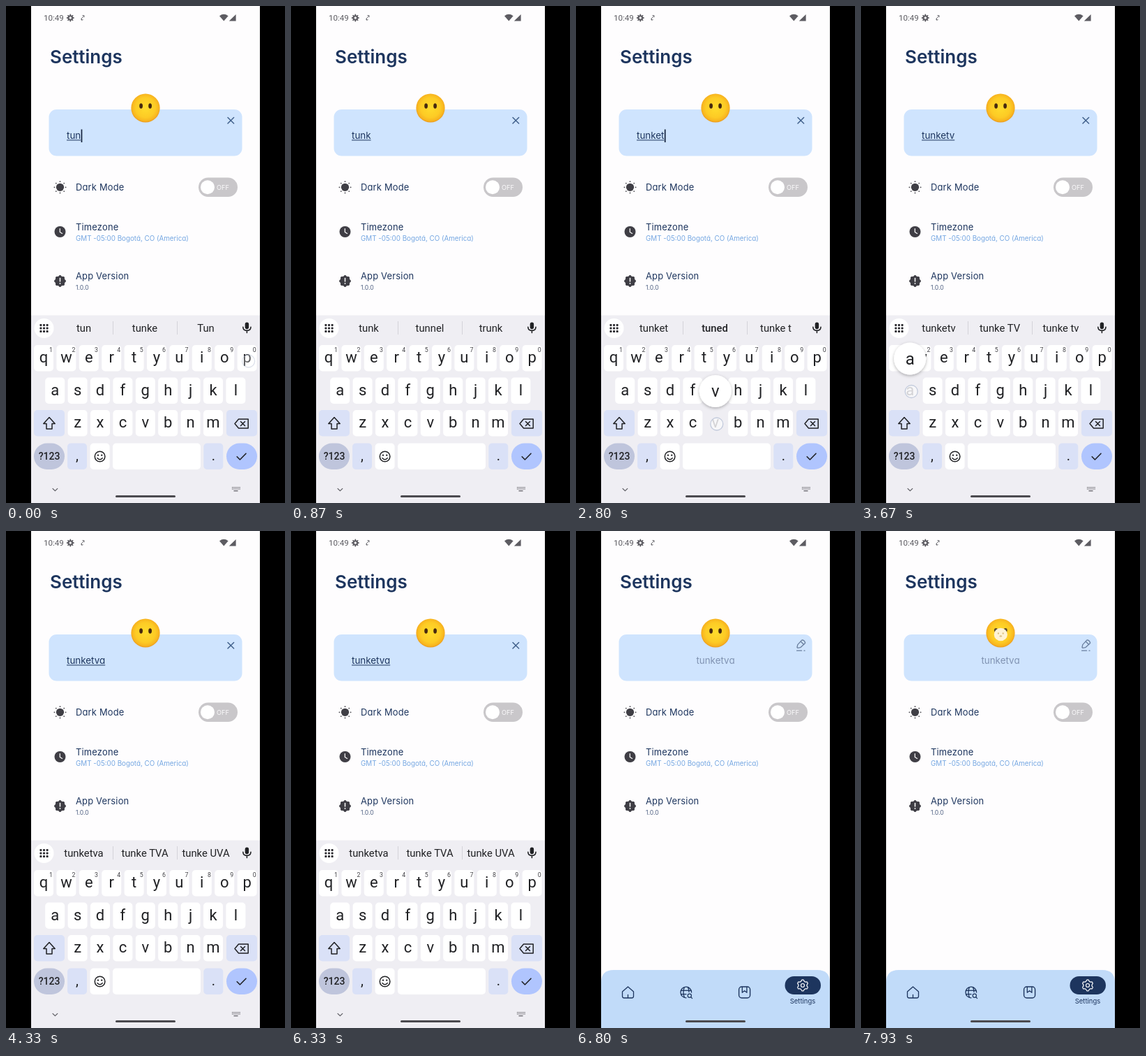
Recreate the animation shown at these times as an HTML page. Size 400 px wide and 711 px high, loop 8 s.

```html
<!DOCTYPE html>
<html lang="en">
<head>
<meta charset="utf-8">
<title>Settings</title>
<style>
  html, body { margin: 0; width: 100%; height: 100%; overflow: hidden; background: #000; }
  svg { display: block; width: 100vw; height: 100vh; }
  text { font-family: Roboto, sans-serif; white-space: pre; }
  .ui { font-family: Inter, "Open Sans", sans-serif; font-feature-settings: "cv11"; font-optical-sizing: none; }
  .label { letter-spacing: .2px; }
  .mid { text-anchor: middle; }
  .line { fill: none; stroke-linecap: round; stroke-linejoin: round; }
</style>
</head>
<body>
<svg id="stage" viewBox="0 0 400 711"></svg>
<script>
const LOOP = 8000, STEP = 0.015;
const NAVY = '#1d355e', DARK = '#3f3e45', INK = '#202124';
const stage = document.getElementById('stage');
const $ = id => document.getElementById(id);

// ---- markup helpers
const rect = (x, y, w, h, r, fill, more = '') =>
  `<rect x="${x}" y="${y}" width="${w}" height="${h}" rx="${r}" fill="${fill}" ${more}/>`;
const dot = (x, y, r, fill, more = '') =>
  `<circle cx="${x}" cy="${y}" r="${r}" fill="${fill}" ${more}/>`;
const oval = (x, y, rx, ry, fill, more = '') =>
  `<ellipse cx="${x}" cy="${y}" rx="${rx}" ry="${ry}" fill="${fill}" ${more}/>`;
const text = (s, x, y, size, fill, more = '') =>
  `<text x="${x}" y="${y}" font-size="${size}" fill="${fill}" ${more}>${s}</text>`;
const line = (d, color, w, more = '') =>
  `<path class="line" d="${d}" stroke="${color}" stroke-width="${w}" ${more}/>`;
const shape = (d, fill, more = '') => `<path d="${d}" fill="${fill}" ${more}/>`;
const group = (id, body, more = '') => `<g id="${id}" ${more}>${body}</g>`;
const UI = 'class="ui"', MID = 'class="mid"';

// closed outline whose radius swings n times around the centre
function wavy(x, y, r, depth, n, sharp = 1) {
  const pts = [];
  for (let i = 0; i < 96; i++) {
    const a = i / 96 * Math.PI * 2;
    const wave = Math.max(-1, Math.min(1, Math.cos(a * n) * sharp));
    const d = r + depth * wave;
    pts.push((x + d * Math.sin(a)).toFixed(2) + ' ' + (y - d * Math.cos(a)).toFixed(2));
  }
  return 'M' + pts.join('L') + 'Z';
}

// ---- app screen
function statusBar() {
  const c = '#5d5c62';
  return text('10:49', 54, 21, 11.6, c) +
    shape(wavy(92.3, 17, 4.6, 0.8, 8, 2), c) + dot(92.3, 17, 1.7, '#fefcfe') +
    line('M108.5 19.5V17.5L111.5 14.5M109.8 13.6H112V15.8M107.7 18.8L108.6 20.4L110.2 19.6', c, 0.9) +
    shape('M306 14.2Q312.3 9.4 318.6 14.2L312.3 21.6Z', c) +
    shape('M329.6 12V21.6H319.8Z', c);
}

function settingsList() {
  let sun = dot(77.5, 259.3, 5.6, DARK);
  for (let i = 0; i < 8; i++) {
    const a = i * Math.PI / 4;
    sun += dot(77.5 + 8.1 * Math.cos(a), 259.3 + 8.1 * Math.sin(a), 0.85, DARK);
  }
  const label = (s, y) => text(s, 100, y, 12.9, NAVY, 'class="ui label"');
  return sun + label('Dark Mode', 264) +
    rect(276, 245.5, 56, 27.5, 13.7, '#c9c7ca') + dot(289, 259.3, 10, '#fff') +
    text('OFF', 302, 262.8, 9.2, '#fbfafb', UI) +
    dot(77.5, 323, 8, DARK) + line('M77.3 318.5V323.4L80.6 325.4', '#fff', 1.2) +
    label('Timezone', 321) +
    text('GMT -05:00 Bogotá, CO (America)', 100, 335.5, 9.8, '#75a7e2', UI) +
    shape(wavy(77.5, 393.5, 7.8, 0.7, 8), DARK) +
    line('M77.5 389.6V394', '#fff', 1.5) + dot(77.5, 397, 0.9, '#fff') +
    label('App Version', 391) + text('1.0.0', 100, 405.5, 8.6, '#4d5f80', UI);
}

function profileCard() {
  const bear =
    oval(-6.8, -5, 2.6, 3, '#54452f') + oval(6.8, -5, 2.6, 3, '#54452f') +
    oval(0, 1, 9.6, 9.2, '#fff3d6') +
    oval(-3.4, -0.5, 1, 1.3, '#d9bd7c') + oval(3.4, -0.5, 1, 1.3, '#d9bd7c') +
    oval(0, 3.4, 1.8, 1.2, '#dcc288');
  return rect(61.5, 148, 277, 66.5, 11, '#cfe4fe') +
    dot(200, 146, 20.6, 'url(#gold)') +
    group('eyes', oval(193.6, 143, 2.4, 3.7, '#47290f') + oval(206.6, 143, 2.4, 3.7, '#47290f')) +
    group('bear', bear) +
    text('', 87, 190, 13.4, NAVY, 'id="name" class="ui"') +
    rect(87, 191.4, 0, 1, 0, NAVY, 'id="rule"') +
    rect(0, 176.5, 1.7, 18.5, 0, '#15233d', 'id="caret"') +
    group('cross', line('M318 159.5L326.6 168M326.6 159.5L318 168', '#41608c', 1.5)) +
    group('pencil', line('M317 166.5L317.8 162.6L323.3 156.6Q324.8 155.3 326.6 156.8L327.8 158Q329.2 159.6 327.8 161.2L322 166.6L317.8 167.4ZM322.2 158L326.4 162.2M316.6 171.2H323.6M327 171.2H328', '#6a7f9f', 1.3));
}

function tabBar() {
  const home = 'M66.5 659L74.5 652L82.5 659V665.5Q82.5 668 80 668H69Q66.5 668 66.5 665.5ZM74.5 663.5V668';
  const globe = 'M165.6 660A7.8 7.8 0 1 0 158 667.8M150.5 657.3H165.3M150.5 662.7H158M155.4 652.8Q152.4 660 155.6 667.4M160.4 652.8Q162 656 162 659.5';
  const mark = 'M238.3 652.3V660.3L241.6 657.8L244.9 660.3V652.3';
  return shape('M36 711V646Q36 628 54 628H346Q364 628 364 646V711Z', '#c1dbf9') +
    line(home, NAVY, 1.3) + line(globe, NAVY, 1.3) +
    `<circle class="line" cx="162.8" cy="664.8" r="2.6" stroke="${NAVY}" stroke-width="1.2"/>` +
    line('M164.8 666.8L166.6 668.6', NAVY, 1.2) +
    rect(233.6, 652, 16, 16, 4, 'none', `stroke="${NAVY}" stroke-width="1.4"`) + line(mark, NAVY, 1.3) +
    rect(299.5, 637, 51.5, 26, 13, NAVY) +
    line(wavy(325, 650, 7, 0.9, 6, 1.4), '#fff', 1.2) +
    `<circle class="line" cx="325" cy="650" r="2.5" stroke="#fff" stroke-width="1.2"/>` +
    text('Settings', 325, 676, 9.5, NAVY, 'class="ui mid"');
}

// ---- keyboard
const ROWS = [['qwertyuiop', 54, 485], ['asdfghjkl', 70.2, 531.5], ['zxcvbnm', 102.6, 578]];
const PITCH = 32.4, KEY_H = 37.5;
const keyAt = {};

function letterKeys() {
  let out = '';
  ROWS.forEach(([letters, x0, y], row) => [...letters].forEach((ch, i) => {
    const x = x0 + i * PITCH;
    keyAt[ch] = { x, y: y + 19 };
    out += rect(x - 14, y, 28, KEY_H, 5, '#fff', `id="cap-${ch}"`) +
      group('glyph-' + ch, text(ch, x, y + 25, 22, INK, MID) +
        (row ? '' : text((i + 1) % 10, x + 10.6, y + 9.5, 8.8, '#414046', MID)));
  }));
  return out;
}

function keyboard() {
  let grid = dot(54.5, 461, 14, '#fff');
  for (let i = 0; i < 9; i++)
    grid += rect(48.4 + i % 3 * 4.6, 454.9 + Math.floor(i / 3) * 4.6, 3, 3, 0.9, '#2b2a2f');
  const mic = rect(342.7, 452.6, 5.4, 9.6, 2.7, INK) +
    line('M339.8 459.3Q340 464.4 345.4 464.4Q350.8 464.4 351 459.3M345.4 464.6V467.5', INK, 1.6);
  const words = [111.5, 199, 286.5].map((x, i) => text('', x, 466, 14.8, INK, `${MID} id="word${i}"`)).join('');
  const bars = rect(153, 451, 1, 19, 0, '#d4d3d9') + rect(245, 451, 1, 19, 0, '#d4d3d9');
  const face = `<circle class="line" cx="134.6" cy="644.5" r="7.3" stroke="${INK}" stroke-width="1.5"/>` +
    dot(132, 642.6, 1.2, INK) + dot(137.2, 642.6, 1.2, INK) + line('M131 646.7Q134.6 651 138.2 646.7', INK, 1.5);
  let tiny = '';
  for (let i = 0; i < 12; i++)
    tiny += rect(324 + i % 6 * 2.1, 688 + Math.floor(i / 6) * 2.3, 1.2, 1.3, 0, '#66656b');
  return rect(36, 442.5, 328, 300, 0, '#efeef3') + grid + mic +
    group('words', bars + words) + letterKeys() +
    rect(40, 578, 44, KEY_H, 5, '#dae1f7') +
    line('M62 588.5L53.8 597.5H58V605H66V597.5H70.2Z', INK, 1.5) +
    rect(316, 578, 44, KEY_H, 5, '#dae1f7') +
    line('M333.5 591H347.2V604H333.5L328 597.5ZM336.5 594.5L342.5 600.5M342.5 594.5L336.5 600.5', INK, 1.5) +
    rect(40, 625.5, 44, KEY_H, 18.7, '#bfc5dc') +
    text('?123', 62, 649, 14, INK, MID + ' font-weight="500"') +
    rect(88, 625.5, 28, KEY_H, 5, '#dae1f7') + text(',', 102, 650, 20, INK, MID) +
    rect(120.6, 625.5, 28, KEY_H, 5, '#fff') + face +
    rect(153, 625.5, 126, KEY_H, 5, '#fff') +
    rect(283.3, 625.5, 28, KEY_H, 5, '#dae1f7') + text('.', 297.3, 650, 20, INK, MID) +
    rect(316, 625.5, 44, KEY_H, 18.7, '#b0c5fe', 'id="enter"') +
    line('M331.2 644.8L335.4 649L344 640.2', INK, 1.6) +
    line('M67 690.3L70.4 693.7L73.8 690.3', '#5b5a60', 1.2) +
    tiny + rect(326.5, 693, 6, 1.3, 0, '#66656b') +
    group('popup', dot(0, 0, 23, '#fff', 'filter="url(#soft)"') + text('', 0, 8, 24, INK, `${MID} id="big"`));
}

stage.innerHTML = `<defs>
  <radialGradient id="gold" cx=".5" cy=".48" r=".53">
    <stop offset="0" stop-color="#ffdc2c"/><stop offset=".65" stop-color="#fdcb25"/>
    <stop offset=".88" stop-color="#f8b51f"/><stop offset="1" stop-color="#e8921b"/>
  </radialGradient>
  <filter id="soft" x="-40%" y="-40%" width="180%" height="180%">
    <feDropShadow dx="0" dy="1.5" stdDeviation="2" flood-opacity=".3"/>
  </filter>
  <clipPath id="phone"><rect x="36" y="0" width="328" height="711"/></clipPath></defs>` +
  rect(0, 0, 400, 711, 0, '#000') +
  `<g clip-path="url(#phone)">` + rect(36, 0, 328, 711, 0, '#fefdfe') + statusBar() +
  text('Settings', 63, 82, 26, NAVY, 'class="ui" font-weight="600"') +
  profileCard() + settingsList() + group('tabs', tabBar()) + group('board', keyboard()) +
  dot(0, 0, 9, '#fff', 'id="touch" fill-opacity=".5" stroke="#c3cbdc" stroke-width="1.3"') +
  rect(157, 700, 86, 3, 1.5, '#4c4b50') + '</g>';

// ---- timeline: key, finger down, finger up, letters typed, suggestions
const NAME = 'tunketva';
const TAPS = [
  ['p', -200, -55, 3, ['tun', 'tunke', 'Tun']],
  ['k', 190, 365, 4, ['tunk', 'tunnel', 'trunk']],
  ['e', 1660, 1800, 5, ['tunke', 'tunnelled', 'tunnellings']],
  ['t', 2260, 2450, 6, ['tunket', 'tuned', 'tunke t']],
  ['v', 2790, 2900, 7, ['tunketv', 'tunke TV', 'tunke tv']],
  ['a', 3660, 3830, 8, ['tunketva', 'tunke TVA', 'tunke UVA']],
  ['enter', 6390, 6460, 8, null]
];
const SUBMIT = 6530, SLIDE = 6497, SLIDE_MS = 310, TABS = 6790, FADE = 130;
keyAt.enter = { x: 336, y: 645 };

const show = (id, on) => $(id).setAttribute('visibility', on ? 'visible' : 'hidden');
const set = (id, k, v) => $(id).setAttribute(k, v);

function drawField(t, last) {
  const done = t >= SUBMIT, name = $('name');
  name.textContent = NAME.slice(0, last[3]);
  set('name', 'fill', done ? '#8093b2' : NAVY);
  const w = name.getComputedTextLength();
  set('name', 'x', done ? 200 - w / 2 : 87);
  set('rule', 'width', w);
  set('caret', 'x', 87 + w + 0.4);
  const since = t - Math.max(last[2], 0);
  show('rule', !done);
  show('caret', !done && since % 1000 < 500);
  show('cross', !done);
  show('pencil', done);
}

function drawTouch(t) {
  const [key, , up] = TAPS.filter(p => t >= p[1]).pop();
  const held = t < up, at = keyAt[key], letter = key.length === 1;
  for (const ch of 'pketva') {
    const down = held && ch === key;
    show('cap-' + ch, !down);
    set('glyph-' + ch, 'opacity', down ? 0.35 : 1);
  }
  show('popup', held && letter);
  if (letter) {
    set('popup', 'transform', `translate(${at.x} ${at.y - 46})`);
    $('big').textContent = key;
  }
  set('enter', 'fill', held && !letter ? '#9db4f0' : '#b0c5fe');
  set('touch', 'cx', at.x + 2);
  set('touch', 'cy', at.y + (key === 'p' ? 4 : 1));
  set('touch', 'opacity', held ? 1 : Math.max(0, 1 - (t - up) / FADE));
}

function drawBoard(t, last) {
  last[4].forEach((w, i) => { $('word' + i).textContent = w; });
  set('word1', 'font-weight', last[3] === 6 ? 500 : 400);
  show('words', t < SUBMIT);
  const p = Math.min(1, Math.max(0, (t - SLIDE) / SLIDE_MS));
  set('board', 'transform', `translate(0 ${268 * (0.5 - 0.5 * Math.cos(Math.PI * p))})`);
  $('board').style.display = t >= TABS ? 'none' : '';
  show('tabs', t >= TABS);
}

function drawFace(t) {
  const size = t < 7790 ? 0 : t < 7925 ? 0.5 : 1;
  set('eyes', 'opacity', size ? 0 : 1);
  set('bear', 'transform', `translate(200.3 147) scale(${size})`);
}

function draw(ms) {
  const t = Math.round(Math.floor(ms * STEP + 0.1) / STEP);
  const last = TAPS.filter(p => p[4] && t >= p[2]).pop();
  drawField(t, last);
  drawTouch(t);
  drawBoard(t, last);
  drawFace(t);
}

const start = performance.now();
function tick(now) {
  draw(Math.max(0, now - start) % LOOP);
  requestAnimationFrame(tick);
}
draw(0);
requestAnimationFrame(tick);
</script>
</body>
</html>
```
